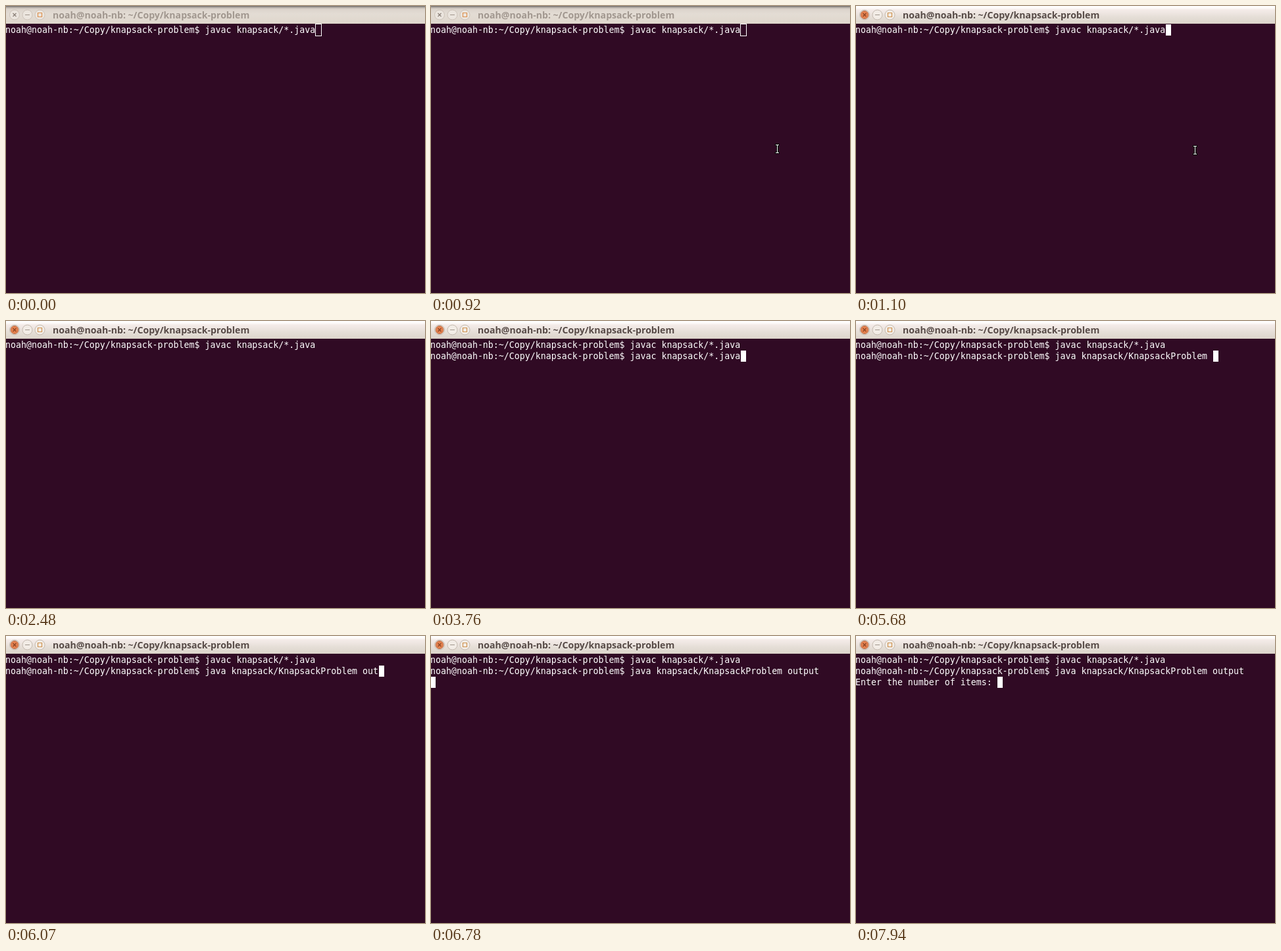
Recreate the animation shown at these times as an HTML page. Size 637 px wide and 437 px high, loop 8000 ms.

```html
<!DOCTYPE html>
<html lang="en">
<head>
<meta charset="utf-8">
<title>Terminal</title>
<style>
  html, body { margin: 0; width: 100%; height: 100%; overflow: hidden; background: #300a24; }
  #stage { position: relative; width: 637px; height: 437px; overflow: hidden; background: #300a24; }
  #bar {
    position: absolute; left: 0; top: 0; width: 637px; height: 27px;
    background: linear-gradient(#fff 0, #fdfbfa 3px, #f4ebe8 6px, #efe7e3 10px, #e6dfd8 16px, #ddd6cc 26px, #d3cabf 27px);
  }
  #bar svg { position: absolute; left: 0; top: 0; }
  #title {
    position: absolute; left: 71px; top: 4px; white-space: pre;
    font: bold 14.1px/20px "Open Sans", "Noto Sans", sans-serif;
    color: #574a46; text-shadow: 0 1px rgba(255, 255, 255, .45);
  }
  .disc { fill: #f2ece6; stroke: #c4b9ae; }
  .core { fill: #e5814f; stroke: #b5704e; }
  .glyph { fill: none; stroke: #a0958b; }
  .cross { stroke: #8a4526; stroke-width: 1.3; }
  .square { stroke: #cf9350; stroke-width: 1.2; }

  .idle #bar { background: linear-gradient(#686461 0, #8f8a86 1px, #c5beb7 3px, #dcd4cc 5px, #e3dcd4 12px, #dfd7cd 26px, #d5ccc1 27px); }
  .idle #title { color: #a1978f; text-shadow: none; }
  .idle .disc { fill: #ebe5de; stroke: #cdc3b9; }
  .idle .core { display: none; }
  .idle .cross { stroke: #8b8078; }
  .idle .square { stroke: #dc914f; }

  .row {
    position: absolute; left: -1px; white-space: pre; color: #fff;
    font: 13.288px/17px "DejaVu Sans Mono", "Liberation Mono", monospace;
  }
  #cursor { position: absolute; width: 8px; height: 17px; background: #fff; }
  .idle #cursor { background: none; outline: 1px solid #fff; }
  #pointer { position: absolute; left: 0; top: 0; fill: none; stroke-linecap: square; }
</style>
</head>
<body>
<div id="stage" class="idle">
  <div id="bar">
    <svg width="64" height="27">
      <circle class="disc" cx="13" cy="13.5" r="7.5"/>
      <circle class="core" cx="13" cy="13.5" r="6"/>
      <circle class="disc" cx="32.5" cy="13.5" r="7.5"/>
      <circle class="disc" cx="51.5" cy="13.5" r="7.5"/>
      <path class="glyph cross" d="M10.5 11l5 5m0-5l-5 5"/>
      <path class="glyph" d="M29 13.5h7"/>
      <path class="glyph square" d="M48.5 10.5h6v6h-6z"/>
    </svg>
    <div id="title">noah@noah-nb: ~/Copy/knapsack-problem</div>
  </div>
  <div id="cursor"></div>
  <svg id="pointer" width="8" height="16">
    <defs><path id="beam" d="M2.5 2.5h4M4.5 2.5v12M2.5 14.5h4"/></defs>
    <use href="#beam" stroke="#000" stroke-width="3"/>
    <use href="#beam" stroke="#fff"/>
  </svg>
</div>
<script>
const LOOP = 8000, FOCUS = 1100, CELL = 8, LINE = 17, TOP = 28;
const PROMPT = 'noah@noah-nb:~/Copy/knapsack-problem$ ';
const COMPILE = PROMPT + 'javac knapsack/*.java';
const RUN = PROMPT + 'java knapsack/KnapsackProblem';
const ASK = 'Enter the number of items: ';

// [time, row, text]
const lines = [
  [0, 0, COMPILE],
  [3340, 1, PROMPT], [3670, 1, COMPILE], [4120, 1, PROMPT], [4580, 1, RUN], [5680, 1, RUN + ' '],
  ...[...'output'].map((c, i) => [5820 + 96 * i, 1, RUN + ' output'.slice(0, i + 2)]),
  [6880, 2, ASK]
];

// [time, row, visible]
const blinks = [
  [0, 0, true], [1670, 0, false], [1880, 1, true], [2480, 1, false], [3080, 1, true],
  [5150, 1, false], [5680, 1, true], [6780, 2, true], [7340, 2, false], [7940, 2, true]
];

const MOVE = { from: 730, gap: 46, steps: 5, hide: 1880, x: 511, y: 211, dx: 118, dy: -26 };

const $ = id => document.getElementById(id);
const stage = $('stage'), cursor = $('cursor'), pointer = $('pointer');

const rows = [0, 1, 2].map(r => {
  const el = document.createElement('div');
  el.className = 'row';
  el.style.top = TOP + LINE * r + 'px';
  stage.insertBefore(el, cursor);
  return el;
});

function drawPointer(t) {
  const shown = t >= MOVE.from && t < MOVE.hide;
  pointer.style.display = shown ? '' : 'none';
  if (!shown) return;
  const step = Math.min(MOVE.steps, Math.floor((t - MOVE.from) / MOVE.gap));
  const left = Math.pow(1 - step / MOVE.steps, 1.5);
  const x = Math.round(MOVE.x + MOVE.dx * left), y = Math.round(MOVE.y + MOVE.dy * left);
  pointer.style.transform = `translate(${x}px, ${y}px)`;
}

function draw(t) {
  const text = ['', '', ''];
  for (const [at, row, value] of lines) if (at <= t) text[row] = value;
  rows.forEach((el, i) => { if (el.textContent !== text[i]) el.textContent = text[i]; });

  const [, row, on] = blinks.filter(b => b[0] <= t).pop();
  cursor.style.left = text[row].length * CELL - 1 + 'px';
  cursor.style.top = TOP + LINE * row + 'px';
  cursor.style.visibility = on ? 'visible' : 'hidden';

  stage.className = t < FOCUS ? 'idle' : '';
  drawPointer(t);
}

const start = performance.now();
function tick() {
  draw((performance.now() - start) % LOOP);
  requestAnimationFrame(tick);
}
tick();
</script>
</body>
</html>
```
